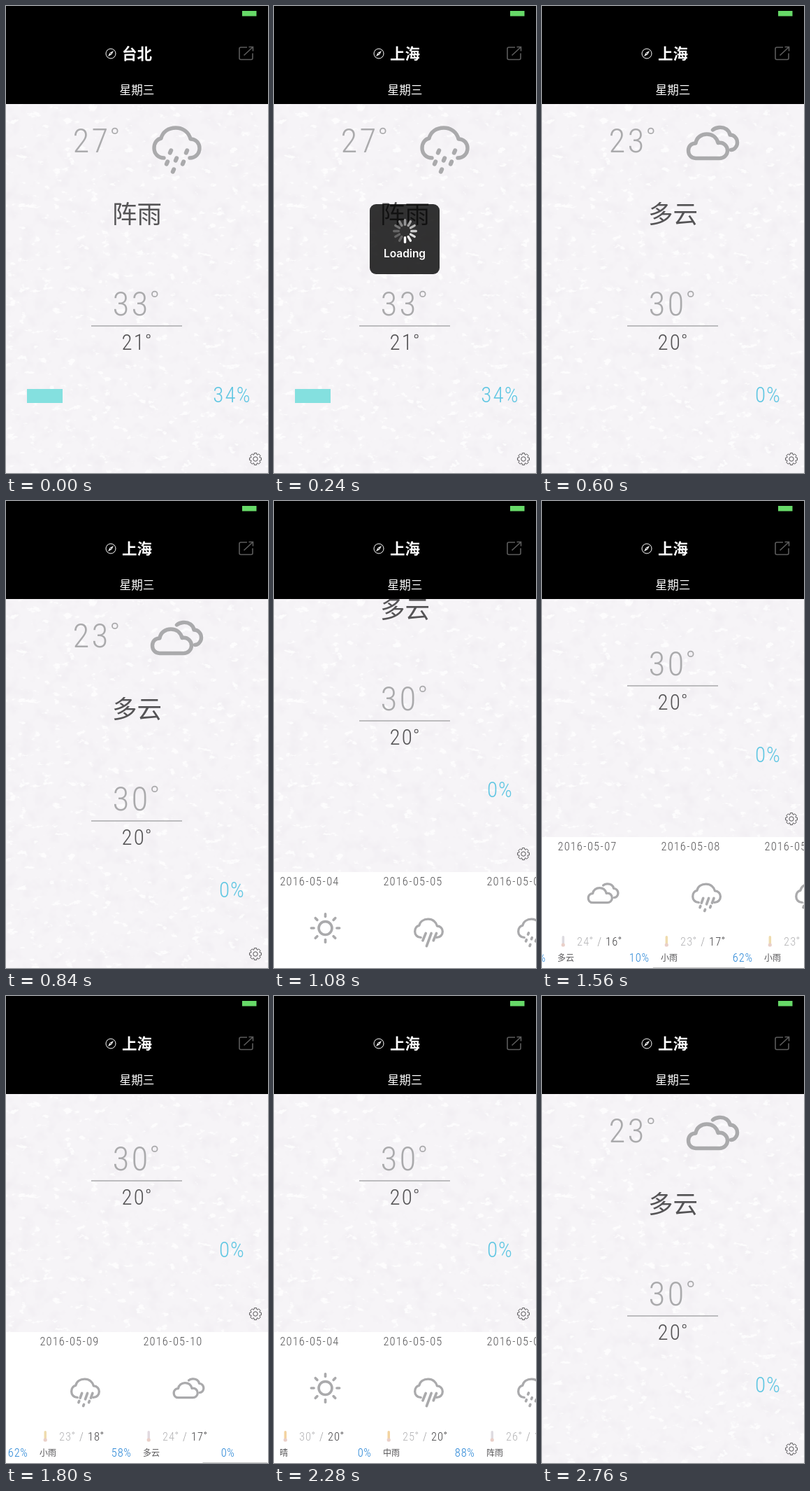
Recreate the animation shown at these times as an HTML page. Size 375 px wide and 667 px high, loop 2.88 s.

```html
<!DOCTYPE html>
<html lang="zh-CN">
<head>
<meta charset="utf-8">
<title>Weather</title>
<style>
  html, body { margin: 0; width: 100%; height: 100%; overflow: hidden; background: #f6f4f7; }
  svg { position: absolute; left: 0; top: 0; display: block; }
  #paper { will-change: transform; }
  text { white-space: pre; }
  .num { font-family: "Roboto Condensed", Roboto, sans-serif; font-stretch: 80%; font-weight: 300; text-anchor: middle; }
  .han { font-family: "Noto Sans CJK SC", "Noto Sans CJK", sans-serif; }
  .mid { text-anchor: middle; }
  .bold { font-weight: 700; }
  .ui { font-family: Inter, sans-serif; font-weight: 600; }
  .icon { fill: none; stroke: #aaaaac; stroke-width: 5.4; stroke-linecap: round; stroke-linejoin: round; }
</style>
</head>
<body>
<svg id="paper" width="375" height="667">
  <filter id="flecks" x="0" y="0" width="100%" height="100%" color-interpolation-filters="sRGB">
    <feTurbulence type="fractalNoise" baseFrequency=".06 .1" numOctaves="4" seed="8"/>
    <feColorMatrix values="0 0 0 0 1  0 0 0 0 1  0 0 0 0 1  9 0 0 0 -5.9"/>
  </filter>
  <filter id="mottle" x="0" y="0" width="100%" height="100%" color-interpolation-filters="sRGB">
    <feTurbulence type="fractalNoise" baseFrequency=".05" numOctaves="3" seed="21"/>
    <feColorMatrix values="0 0 0 0 .9  0 0 0 0 .88  0 0 0 0 .91  0 .7 0 0 -.33"/>
  </filter>
  <rect width="375" height="667" fill="#f6f4f7"/>
  <rect width="375" height="667" filter="url(#mottle)"/>
  <rect width="375" height="667" filter="url(#flecks)" opacity=".8"/>
</svg>
<svg id="stage" width="375" height="667" viewBox="0 0 375 667"></svg>

<script>
const STEP = 120, LOOP = 2880;
const PITCH = 148, MAX_X = 661, CONTENT_W = 1036;
const GREY = '#aaaaac', DARK = '#555456', CYAN = '#5fc6e2';

// Icons are drawn around their own centre.
const line = (x1, y1, x2, y2, w = 6) =>
  `<path d="M${x1} ${y1}L${x2} ${y2}" stroke-width="${w}"/>`;
const drop = (x, y) => line(x + .7, y - 1.7, x - .7, y + 1.7);
const drops = list => list.map(p => drop(...p)).join('');
const rainCloud = `<path d="M-18.5 22C-26.5 22-32.5 16-32.5 8C-32.5 0-28-5-22.5-6
  C-20.5-15-12.5-21-1.5-21C9.5-21 17.5-14 19.5-5C27.5-5 32.5 1 32.5 8C32.5 16 26.5 22 18.5 22"/>`;

const icons = {
  shower: rainCloud + drops([[-9, 13], [14, 13], [-14, 29], [-1, 24], [9, 29], [-5, 40]]),
  rain: rainCloud + line(-7, 12, -14, 29) + line(6, 12, -5, 42) + line(18, 12, 11, 29),
  drizzle: rainCloud + line(-8, 12, -12, 23) + line(5, 12, 0, 26) + line(17, 12, 13, 23)
    + drops([[-15, 32], [-4, 40], [9, 32]]),
  cloudy: `<path d="M-24.5 22.5C-31.5 22.5-35 17-35 11.5C-35 5-30.5 1-24.5 1
    C-23.5-7-16.5-12-8.5-12C-.5-12 5.5-7 7.5.5C15.5-1 21 5 21 11.5C21 18 15.5 22.5 9.5 22.5Z"/>
    <path d="M0-18C4-21.5 13-23.5 19.5-19C22.5-17 24-14 24.5-11C30.5-11 35-6 35 0C35 6 30.5 10.5 26 10.5"/>`,
  sun: '<circle r="15.5" stroke-width="6"/>' + [...Array(8).keys()].map(i =>
    `<g transform="rotate(${i * 45})">${line(0, -27, 0, -33)}</g>`).join('')
};

const icon = (name, x, y, scale = 1) =>
  `<g class="icon" transform="translate(${x} ${y}) scale(${scale})">${icons[name]}</g>`;

const text = (x, y, size, str, fill, cls, id = '') =>
  `<text id="${id}" class="${cls}" x="${x}" y="${y}" font-size="${size}" fill="${fill}">${str}</text>`;

// Tabular figures: every glyph is centred in a cell of fixed pitch.
const cell = c => ({ '-': .37, '%': .65 })[c] || .55;

// align: 0 = start, .5 = middle, 1 = end
const num = (x, y, size, value, fill, align = 0) => {
  const chars = [...String(value)], widths = chars.map(c => cell(c) * size);
  let left = x - align * widths.reduce((a, b) => a + b);
  const centres = widths.map(w => (left += w) - w / 2);
  return text(centres.map(c => c.toFixed(2)).join(' '), y, size, chars.join(''), fill, 'num');
};

const temp = (x, y, size, n, fill) => num(x - size * .06, y, size, n, fill) +
  `<circle cx="${x + size * 1.2}" cy="${y - size * .625}" r="${size * .078}"
    fill="none" stroke="${fill}" stroke-width="${Math.max(1, size * .036)}"/>`;

const today = (id, now, kind, label, hi, lo, rain) => `<g id="${id}">
  ${temp(97, 209, 49, now, GREY)}
  ${icon(kind, 244.5, 195)}
  ${text(187.5, 310, 35.5, label, DARK, 'han mid')}
  ${temp(154, 442, 49, hi, GREY)}
  ${temp(166.5, 491, 31, lo, DARK)}
  <rect x="30" y="547" width="${rain * 1.5}" height="20" fill="#84e0df"/>
  ${num(322.5, 565.5, 31, rain + '%', CYAN, .5)}
</g>`;

const days = [
  ['04', 'sun', '晴', 30, 20, 0, '#f3d3a0'],
  ['05', 'rain', '中雨', 25, 20, 88, '#f3d3a0'],
  ['06', 'shower', '阵雨', 26, 16, 79, '#dedbe0'],
  ['07', 'cloudy', '多云', 24, 16, 10, '#dedbe0'],
  ['08', 'drizzle', '小雨', 23, 17, 62, '#efdcae'],
  ['09', 'drizzle', '小雨', 23, 18, 58, '#efdcae'],
  ['10', 'cloudy', '多云', 24, 17, 0, '#e2d9e0']
];

const dayCard = ([date, kind, label, hi, lo, rain, tint], i) => `
  <g transform="translate(${8 + i * PITCH} 673)">
    ${num(0, 19, 16.5, '2016-05-' + date, DARK)}
    ${icon(kind, 65.5, 80, .61)}
    <rect x="6.5" y="141" width="3.5" height="12" rx="1.7" fill="${tint}"/>
    <circle cx="8.2" cy="154" r="2.6" fill="#e9cfc8"/>
    ${temp(28.5, 154.5, 16.5, hi, '#b4b4b6')}
    ${num(60, 154.5, 16.5, '/', '#a0a0a2', .5)}
    ${temp(69.5, 154.5, 16.5, lo, '#454446')}
    ${text(0, 177, 12, label, DARK, 'han')}
    ${num(131, 177.5, 16.5, rain + '%', '#2584d6', 1)}
  </g>`;

const gear = () => {
  const pts = [];
  for (let i = 0; i < 8; i++) {
    [[-.32, 6.5], [-.2, 8.6], [.2, 8.6], [.32, 6.5]].forEach(([da, r]) => {
      const a = i * Math.PI / 4 + da;
      pts.push((r * Math.cos(a)).toFixed(2) + ',' + (r * Math.sin(a)).toFixed(2));
    });
  }
  return `<g transform="translate(357 647)" fill="none" stroke="${DARK}" stroke-linejoin="round">
    <polygon points="${pts.join(' ')}"/><circle r="3.2"/></g>`;
};

const header = `
  <rect width="375" height="140" fill="#000"/>
  <rect x="338" y="7" width="20.5" height="7.5" fill="#67d968"/>
  <g transform="translate(150 68)">
    <circle r="7" fill="none" stroke="#fff"/>
    <path d="M4-4L1.3 1.3L-4 4L-1.3-1.3Z" fill="#fff"/>
    <circle r=".8"/>
  </g>
  ${text(187.5, 76, 21.5, '', '#fff', 'han mid bold', 'city')}
  ${text(187.5, 126, 16.6, '星期三', '#fff', 'han mid')}
  <path d="M345 59H336Q334 59 334 61V74.5Q334 76.500 336 76.500H351Q353 76.500 353 74.5V67.5M340.5 70.5L353.500 58.500M347.500 58.500H353.500V64.500"
    fill="none" stroke="#5c5c5c" stroke-width="1.6"/>`;

const hud = `<g id="hud">
  <rect x="137" y="283" width="100" height="100" rx="9" fill="#000" fill-opacity=".8"/>
  <g id="spinner" transform="translate(187.5 321.5)">${[...Array(12).keys()].map(i =>
    `<rect x="-1.7" y="-17.5" width="3.4" height="10" rx="1.7" fill="#fff" transform="rotate(${i * 30})"/>`).join('')}
  </g>
  ${text(187, 359, 15.5, 'Loading', '#fff', 'ui mid')}
</g>`;

const $ = id => document.getElementById(id);

$('stage').innerHTML = `
  <g id="page">
    ${today('before', 27, 'shower', '阵雨', 33, 21, 34)}
    ${today('after', 23, 'cloudy', '多云', 30, 20, 0)}
    <rect x="122" y="456.2" width="130" height="1.5" fill="${GREY}"/>
    ${gear()}
    <rect y="673" width="375" height="200" fill="#fff"/>
    <g id="days">${days.map(dayCard).join('')}</g>
  </g>
  <rect id="bar" y="666" height="2" rx="1" fill="#c4c4c4"/>
  ${header}${hud}`;

const spokes = [...$('spinner').children];

const track = (keys, t) => {
  if (t <= keys[0][0]) return keys[0][1];
  for (let i = 1; i < keys.length; i++) {
    const [t0, a] = keys[i - 1], [t1, b] = keys[i];
    if (t <= t1) {
      const u = (t - t0) / (t1 - t0);
      return a + (b - a) * u * u * (3 - 2 * u);
    }
  }
  return keys[keys.length - 1][1];
};

const scrollY = [[840, 0], [1200, 193], [2400, 193], [2760, 0]];
const scrollX = [[1233, 0], [1800, 700], [1920, MAX_X], [2280, 0]];
const show = (id, on) => $(id).setAttribute('visibility', on ? 'visible' : 'hidden');

function draw(t) {
  const x = track(scrollX, t), y = track(scrollY, t);
  const loaded = t >= 600;

  show('before', !loaded);
  show('after', loaded);
  $('city').textContent = t < STEP ? '台北' : '上海';

  $('page').setAttribute('transform', `translate(0 ${-y})`);
  $('days').setAttribute('transform', `translate(${-x} 0)`);

  // The indicator shrinks while the list is pulled past its end.
  const over = Math.max(0, x - MAX_X);
  $('bar').setAttribute('x', 3 + (x - over) * 375 / CONTENT_W + over);
  $('bar').setAttribute('width', 132 - over);
  show('bar', t >= 1320 && t < 2280);

  show('hud', t >= STEP && !loaded);
  const head = Math.round(6 + (t - 240) / 1000 * 12);
  spokes.forEach((s, i) => {
    const lag = ((head - i) % 12 + 12) % 12;
    s.setAttribute('opacity', Math.max(.25, 1 - lag * .085));
  });
}

let last = -1;
const start = performance.now();
function tick() {
  const t = Math.floor((performance.now() - start) % LOOP / STEP) * STEP;
  if (t !== last) draw(last = t);
  requestAnimationFrame(tick);
}
tick();
</script>
</body>
</html>
```
